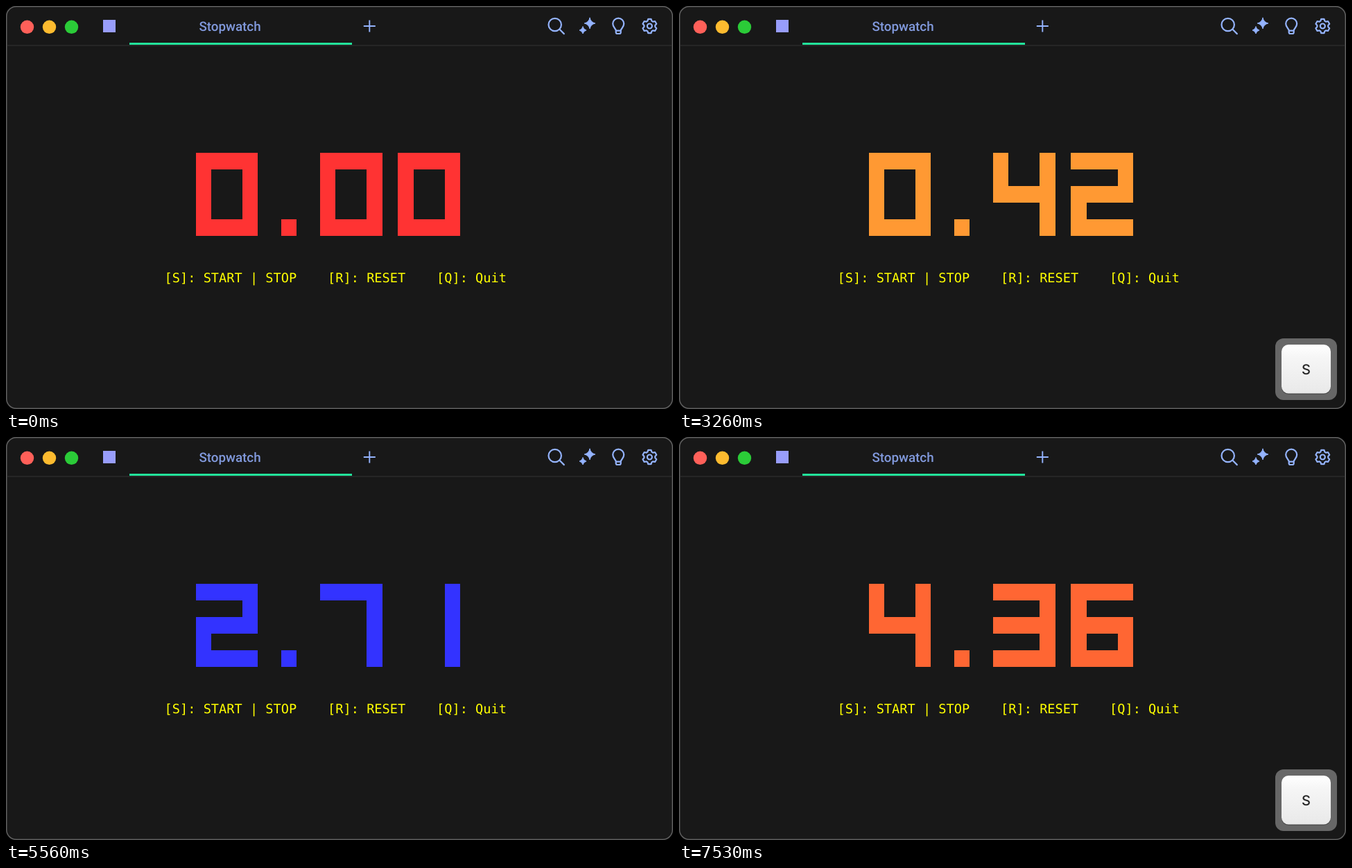
Animation of 962 by 582 pixels, one loop 8 s. Source, as an HTML page:

```html
<!DOCTYPE html>
<html lang="en">
<head>
<meta charset="utf-8">
<title>Stopwatch</title>
<style>
  html, body { margin: 0; width: 100%; height: 100%; overflow: hidden; background: #000; }
  svg { display: block; width: 962px; height: 582px; }
  text { text-rendering: geometricPrecision; white-space: pre; }
  .tab { font: 500 18.8px Roboto, sans-serif; fill: #8199dc; text-anchor: middle; }
  .help { font: 18.636px "DejaVu Sans Mono", monospace; fill: #ff0; }
  .cap { font: 500 20px Inter, sans-serif; fill: #262626; text-anchor: middle; }
  .icons { fill: none; stroke: #94b3fd; stroke-width: 2.2; stroke-linecap: round; stroke-linejoin: round; }
  .icons .solid { fill: #94b3fd; stroke-width: 1; }
</style>
</head>
<body>
<svg viewBox="0 0 962 582">
  <defs>
    <linearGradient id="face" x1="0" y1="0" x2="0" y2="1">
      <stop offset="0" stop-color="#fff"/>
      <stop offset=".25" stop-color="#f6f6f6"/>
      <stop offset="1" stop-color="#e9e9e9"/>
    </linearGradient>
  </defs>

  <rect x=".75" y=".75" width="960.5" height="580.5" rx="14" fill="#181818" stroke="#606060" stroke-width="1.5"/>
  <rect x="1.5" y="56.5" width="959" height="1" fill="#343434"/>

  <circle cx="30.5" cy="30.3" r="9.7" fill="#ff6059"/>
  <circle cx="62.5" cy="30.3" r="9.7" fill="#fdbb2f"/>
  <circle cx="94.5" cy="30.3" r="9.7" fill="#2bcb38"/>
  <rect x="140" y="20" width="18" height="18" fill="#989dfb"/>

  <text class="tab" x="323" y="36">Stopwatch</text>
  <rect x="178" y="53" width="321" height="3" fill="#22e39b"/>

  <g class="icons">
    <path d="M515.8 29h17M524.3 20.5v17" stroke-width="1.9" stroke-linecap="butt"/>
    <circle cx="791.7" cy="27" r="9.2"/>
    <path d="M798.5 33.8l6.3 6.3"/>
    <path class="solid" d="M842 17.2q1.4 6.4 7.8 7.8q-6.4 1.4-7.8 7.8q-1.4-6.4-7.8-7.8q6.4-1.4 7.8-7.8z"/>
    <path class="solid" d="M832 30q1 4 5 5q-4 1-5 5q-1-4-5-5q4-1 5-5z"/>
    <path d="M879.7 35.6c0-3.4-4.5-4.4-4.5-10a8 8 0 0 1 16 0c0 5.600-4.500 6.600-4.500 10z M879.700 35.600v2.400q0 2 2 2h3q2 0 2-2v-2.400"/>
    <path id="gear"/>
    <circle cx="928.3" cy="29" r="3.5"/>
  </g>

  <path id="digits"/>
  <rect id="dot" x="397" y="308" width="22" height="24"/>
  <text class="help" x="228.6" y="399.3">[S]: START | STOP    [R]: RESET    [Q]: Quit</text>

  <g id="key">
    <rect x="860" y="480" width="89" height="89" rx="12" fill="#676767"/>
    <rect x="869" y="490.500" width="71" height="70.500" rx="10" fill="#3c3c3c" opacity=".55"/>
    <rect x="869" y="489" width="71" height="70.500" rx="10" fill="url(#face)"/>
    <text class="cap" x="904.500" y="532">S</text>
  </g>
</svg>

<script>
  const LOOP = 8000;
  const $ = id => document.getElementById(id);
  const [gear, digits, dot, key] = ["gear", "digits", "dot", "key"].map($);

  // Six-toothed gear outline from polar points
  const polar = (deg, r) => {
    const a = (deg - 90) * Math.PI / 180;
    return `${928.3 + r * Math.cos(a)} ${29 + r * Math.sin(a)}`;
  };
  const teeth = [0, 60, 120, 180, 240, 300].flatMap(d =>
    [[-22, 8], [-12, 10.4], [12, 10.4], [22, 8]].map(([o, r]) => polar(d + o, r)));
  gear.setAttribute("d", `M${teeth.join("L")}z`);

  // Seven segments as x0, y0, x1, y1 on a 4 by 5 block grid
  const SEGMENTS = {
    a: [0, 0, 4, 1], b: [3, 0, 4, 3], c: [3, 2, 4, 5], d: [0, 4, 4, 5],
    e: [0, 2, 1, 5], f: [0, 0, 1, 3], g: [0, 2, 4, 3]
  };
  const GLYPHS = ["abcdef", "bc", "abged", "abgcd", "fgbc", "afgcd", "afgedc", "abc", "abcdefg", "abcdfg"];
  const COLUMNS = [0, 8, 13];
  const px = col => Math.round(273.5 + col * 22.44);
  const py = row => 212 + row * 24;

  const glyph = (digit, col) => [...GLYPHS[digit]].map(s => {
    const [x0, y0, x1, y1] = SEGMENTS[s];
    return `M${px(col + x0)} ${py(y0)}H${px(col + x1)}V${py(y1)}H${px(col + x0)}z`;
  }).join("");

  // Clock readings at given ticks of 1/30 s, linear between them
  const READINGS = [[85, 0], [98, .42], [99, .42], [144, 1.91], [167, 2.71], [198, 3.72], [218, 4.36]];
  const reading = tick => {
    if (tick <= READINGS[0][0]) return 0;
    const i = READINGS.findIndex(r => tick <= r[0]);
    if (i < 0) return READINGS[READINGS.length - 1][1];
    const [n0, v0] = READINGS[i - 1], [n1, v1] = READINGS[i];
    return v0 + (v1 - v0) * (tick - n0) / (n1 - n0);
  };

  const BLINKS = [60, 530, 1030, 1560, 2030, 2530, 7290, 7530];
  const COLOR_STEP = .1685;

  function draw(t) {
    const tick = Math.floor((Math.floor(t / 10) * 10 + 10.01) * .03);
    const value = reading(tick);
    const text = String(Math.round(value * 100)).padStart(3, "0");
    const color = `hsl(${Math.floor(value / COLOR_STEP) * 15 % 360} 100% 60%)`;

    digits.setAttribute("d", COLUMNS.map((col, i) => glyph(text[i], col)).join(""));
    digits.setAttribute("fill", color);
    dot.setAttribute("fill", color);
    dot.style.display = BLINKS.filter(b => b <= t).length % 2 ? "none" : "";
    key.style.display = (t >= 2830 && t < 4000) || t >= 7260 ? "" : "none";
  }

  const start = performance.now();
  function frame() {
    draw((performance.now() - start) % LOOP);
    requestAnimationFrame(frame);
  }
  frame();
</script>
</body>
</html>
```
